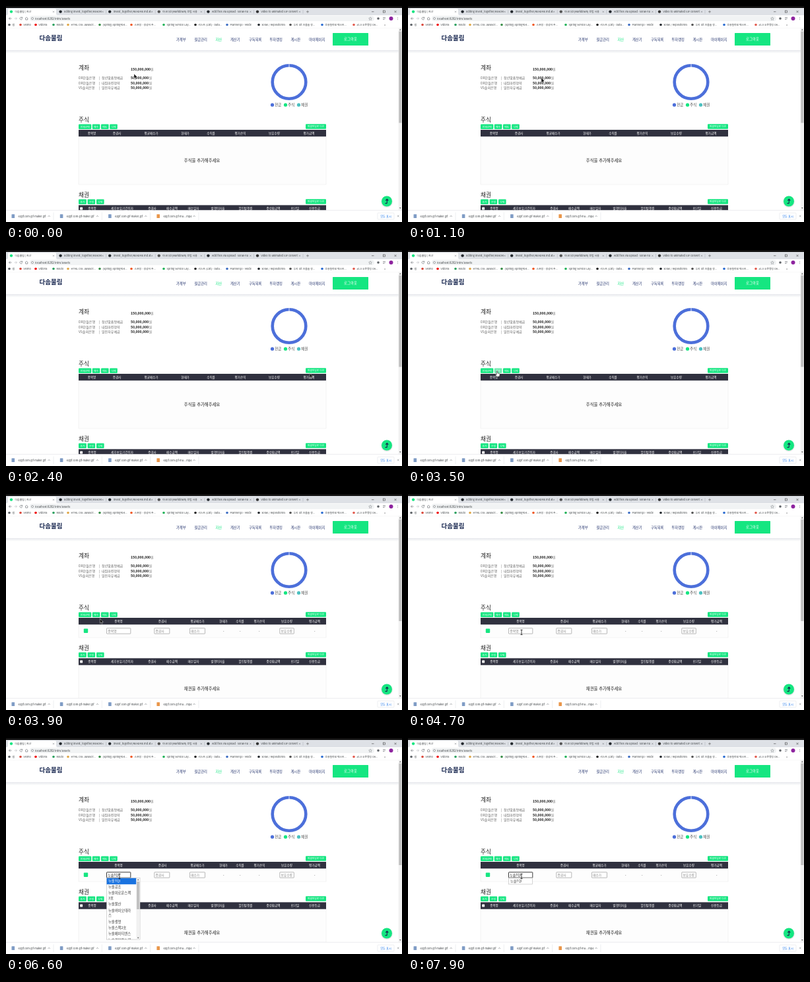
An HTML page that plays this animation: 600 px wide and 328 px high, repeating every 8000 ms.

```html
<!DOCTYPE html>
<html lang="ko">
<head>
<meta charset="utf-8">
<title>자산</title>
<style>
html, body { margin: 0; width: 100%; height: 100%; overflow: hidden; background: #fff; }
svg { display: block; width: 600px; height: 328px; }
text { font-family: "Noto Sans CJK KR", "Noto Sans CJK", "Noto Sans", sans-serif; white-space: pre; }
</style>
</head>
<body>
<svg id="stage" viewBox="0 0 600 328"></svg>
<script>
const LOOP = 8000, STEP = 100;
const GREEN = '#15e681', DARK = '#30313f', NAVY = '#26356f', BLUE = '#4c6fda';

const rect = (x, y, w, h, fill, extra = '') =>
  `<rect x="${x}" y="${y}" width="${w}" height="${h}" fill="${fill}" ${extra}/>`;
const dot = (x, y, r, fill) => `<circle cx="${x}" cy="${y}" r="${r}" fill="${fill}"/>`;
const line = (d, color, width = .6) =>
  `<path d="${d}" fill="none" stroke="${color}" stroke-width="${width}"/>`;
const text = (x, y, size, str, fill = '#222', extra = '') =>
  `<text x="${x}" y="${y}" font-size="${size}" fill="${fill}" ${extra}>${str}</text>`;
const mid = (x, y, size, str, fill, extra = '') =>
  text(x, y, size, str, fill, 'text-anchor="middle" ' + extra);
const group = (id, body, extra = '') => `<g id="${id}" ${extra}>${body}</g>`;
const cross = (x, y, r, color) =>
  line(`M${x - r} ${y - r}l${2 * r} ${2 * r}m0 ${-2 * r}l${-2 * r} ${2 * r}`, color, .5);

const button = (x, y, w, label, id = '') =>
  rect(x, y, w, 7.6, GREEN, `rx="1" id="${id}"`) + mid(x + w / 2, y + 5.1, 3.8, label, '#fff');
const headRow = (y, cells) => rect(110, y, 375, 10.6, DARK) +
  cells.map(([x, label]) => mid(x, y + 7, 4.6, label, '#fff', 'font-weight="500"')).join('');

function browserTop() {
  const tabs = [
    ['다솜불림 | 자산', GREEN], ['Editing invest_together/READM', '#24292e'],
    ['invest_together/README.md at', '#24292e'], ['마크다운(Markdown) 문법 사용', '#555'],
    ['Add files via upload · sorae-nu', '#24292e'], ['Video to animated GIF convert', '#333']
  ];
  const marks = [
    [5, '앱', '#5f6368'], [22, 'Velmo', '#d94a3d'], [45, 'Vidorra', '#f00000'], [72, 'Routo', '#2da160'],
    [94, 'HTML CSS JavaScri...', '#e0a848'], [142, '(Spring) Spring에서...', '#3b8f4a'],
    [190, '스프링 - 생성자 주...', '#f05a28'], [239, 'Spring Service Lay...', '#24b35a'],
    [287, '리스트 (List) - Data...', '#222'], [335, 'PlannerQo - Mode', '#3f6fc4'],
    [383, 'sorae / Repositories', '#24292e'], [431, '우리 Git 흐름을 정...', '#555'],
    [479, '운용철학원 텍스트...', '#2c6dd2'], [527, '#1.0 오픈뱅킹 OA...', '#e35b4f']
  ];
  let out = rect(0, 0, 600, 14, '#dee1e6') + rect(0, 0, 600, 3, '#111') +
    '<path d="M1 14Q3 14 3 11V6Q3 4 5 4H74Q76 4 76 6V11Q76 14 78 14Z" fill="#fff"/>';
  tabs.forEach(([label, color], i) => {
    const x = 8 + i * 74.6;
    out += dot(x, 8.6, 2.2, color) + text(x + 5.5, 10.2, 3.9, label, '#3c4043') +
      cross(x + 64, 8.7, 1, '#5f6368');
    if (i) out += line(`M${x + 69} 6v5.5`, '#9aa0a6', .4);
  });
  out += line('M455 8.7h4m-2 -2v4', '#444', .5) + line('M554 8.7h3.5', '#222', .5) +
    rect(571.5, 7, 3, 3, 'none', 'stroke="#222" stroke-width=".5"') + cross(590, 8.6, 1.5, '#222');
  out += rect(0, 14, 600, 19, '#fff') + rect(36, 14.8, 522, 8.2, '#f1f3f4', 'rx="4.1"') +
    line('M8.5 19H4.5m1.8 -1.8L4.5 19l1.8 1.8', '#5f6368') +
    line('M12.5 19h4m-1.8 -1.8l1.8 1.8l-1.8 1.8', '#b5b8bc') +
    line('M24.4 17.8a1.9 1.9 0 1 0 .3 1.8M24.8 16.6v1.7h-1.7', '#5f6368') +
    line('M29 19l2.2 -2l2.2 2M29.7 18.7v2.3h3v-2.3', '#5f6368') +
    '<circle cx="40" cy="19" r="1.6" fill="none" stroke="#5f6368" stroke-width=".5"/>' +
    text(44, 20.5, 4.2, 'localhost:8202/intro/assets', '#3c4043') +
    '<path d="M552 16.8l.7 1.5 1.7.2-1.2 1.2.3 1.7-1.5-.8-1.5.8.3-1.7-1.2-1.2 1.7-.2z" fill="none" stroke="#5f6368" stroke-width=".4"/>' +
    dot(564, 19, 1.8, '#5f6368') + line('M571 17.5h4m-4 1.5h4m-4 1.5h2.5', '#5f6368', .5) +
    dot(583.5, 19, 3, '#8e249f') + [17.3, 19, 20.7].map(y => dot(593.5, y, .45, '#5f6368')).join('');
  marks.forEach(([x, label, color]) => {
    out += dot(x, 28.5, 1.8, color) + text(x + 4.6, 30, 3.8, label, '#3c4043');
  });
  return out + text(573, 30, 4.5, '»', '#444');
}

function header() {
  const menu = [[258, '가계부'], [285.5, '월급관리'], [317.5, '자산'], [340, '계산기'],
    [368, '구독목록'], [399.5, '투자랭킹'], [431.5, '게시판'], [459, '마이페이지']];
  return rect(0, 33, 595, 39, 'url(#shade)') + rect(0, 33, 595, 34, '#fff') +
    line('M0 33.2H600', '#e2e4e7', .4) +
    text(50.5, 52, 9.5, '다솜불림', '#17264f', 'font-weight="900"') +
    menu.map(([x, s]) => text(x, 52.5, 5.3, s, s === '자산' ? GREEN : NAVY, 'font-weight="500"')).join('') +
    rect(495, 41, 54, 19, GREEN, 'rx=".6"') + mid(522, 52.4, 5.4, '로그아웃', '#fff', 'font-weight="500"');
}

function account() {
  const rows = [['DR한들은행', '청년맞춤형예금'], ['DR한들은행', '내집마련청약'], ['VS솔뫼은행', '알찬자유예금']];
  const amount = (y, s) => text(189, y, 5.05, s, '#111', 'font-weight="700"');
  let out = text(110, 97, 8.8, '계좌', '#222', 'font-weight="500"') +
    amount(97.5, '150,000,000') + text(219, 97.5, 5, '원', '#777');
  rows.forEach(([bank, product], i) => {
    const y = 111.2 + i * 7.4;
    out += text(110, y, 5, bank, '#666') + text(140.4, y, 5, '|', '#666') +
      text(145, y, 5, product, '#666') + amount(y, '50,000,000') + text(216.5, y, 5, '원', '#777');
  });
  out += `<circle cx="429" cy="115.5" r="25.3" fill="none" stroke="${BLUE}" stroke-width="4.6"/>` +
    rect(428.6, 87, .8, 7, '#fff');
  [['현금', BLUE], ['주식', GREEN], ['채권', '#4bc0c0']].forEach(([s, color], i) => {
    out += dot(403.5 + i * 20, 150.2, 2.6, color) + text(407.3 + i * 20, 152.1, 5.3, s, '#444');
  });
  return out;
}

function stocks() {
  const box = (x, w, label, id = '') =>
    rect(x, 203.8, w, 8.4, '#fff', `rx=".6" stroke="#888" stroke-width=".6" id="${id}"`) +
    (label ? text(x + 1.7, 209.8, 4.7, label, '#888') : '');
  const empty = headRow(188, [[130, '종목명'], [168, '증권사'], [220, '평균매수가'], [271.5, '현재가'],
    [310.5, '수익률'], [355, '평가손익'], [406.5, '보유수량'], [459, '평가금액']]) +
    rect(110, 198.6, 375, 72.4, '#fdfdfd', 'stroke="#e8e8e8" stroke-width=".5"') +
    mid(297, 237.2, 6.35, '주식을 추가해주세요', '#222', 'font-weight="500"');
  const filled = headRow(188, [[170.5, '종목명'], [237, '증권사'], [290, '평균매수가'], [329.5, '현재가'],
    [354.5, '수익률'], [384, '평가손익'], [425.5, '보유수량'], [467.5, '평가금액']]) +
    rect(110, 198.6, 375, 19.4, '#fdfdfd', 'stroke="#e8e8e8" stroke-width=".5"') +
    rect(117.8, 204.5, 6.4, 6.4, GREEN, 'rx="1"') +
    box(152.5, 36.3, '', 'field') + box(224.8, 23, '증권사') + box(278.5, 23, '매수가') + box(414.8, 21.5, '보유수량') +
    [329.5, 354.5, 383.5, 467.5].map(x => mid(x, 209.8, 5, '-', '#444')).join('') +
    text(154.2, 209.8, 4.9, '', '#222', 'id="typed"') + rect(0, 205.4, .4, 5.2, '#111', 'id="caret"');
  return text(110, 175.5, 8.7, '주식', '#222', 'font-weight="500"') +
    button(110, 179.5, 19.3, '전체선택') + button(130.8, 179.5, 11.6, '매수', 'buy') +
    button(144, 179.5, 11.6, '매도') + button(157.2, 179.5, 11.6, '삭제') +
    button(454, 179.2, 31, '엑셀파일로 다운') + group('empty', empty) + group('filled', filled);
}

function bonds() {
  return text(110, 289.7, 8.7, '채권', '#222', 'font-weight="500"') +
    button(110, 293.5, 11.8, '추가') + button(123.6, 293.5, 11.6, '수정') + button(137, 293.5, 11.6, '삭제') +
    button(454, 293.2, 31, '엑셀파일로 다운') +
    headRow(302.4, [[130.5, '종목명'], [176, '세후보유기간이자'], [221.5, '증권사'], [251.5, '매수금액'],
      [284, '매수일자'], [321, '발행이자율'], [363, '할인발행률'], [405, '중상환금액'], [438, '만기일'], [467.5, '신용등급']]) +
    rect(112.2, 305.6, 3.9, 3.9, '#fff', 'rx=".5"') +
    rect(110, 313, 375, 73, '#fdfdfd', 'stroke="#e8e8e8" stroke-width=".5"') +
    mid(297, 351.3, 6.35, '채권을 추가해주세요', '#222', 'font-weight="500"');
}

function dropdowns() {
  const items = [['누솔공조', 228], ['누솔이로운스팩', 237], ['3호', 244.5], ['누솔물산', 254], ['누솔바이오테라', 263.7],
    ['스', 271], ['누솔생명', 280.7], ['누솔스팩2호', 290], ['누솔에이티엔스', 299.3], ['누솔케미칼소재', 308.5]];
  const frame = (w, h) => rect(152.4, 212.6, w, h, '#fff', 'stroke="#aaa" stroke-width=".5"');
  const list = frame(50.6, 93.4) + rect(152.6, 212.8, 44.8, 9.4, '#1a73e0', 'id="picked"') +
    text(155, 219.2, 5.3, '누솔TQI', '#333', 'id="first"') +
    `<g clip-path="url(#listClip)">${items.map(([s, y]) => text(155, y, 5.3, s, '#333')).join('')}</g>` +
    rect(197.5, 212.8, 5.3, 93, '#f1f1f1') + rect(198, 218, 4.3, 42, '#c1c1c1') +
    '<path d="M198.9 216l1.3-1.6 1.3 1.6zM198.9 302.8l1.3 1.6 1.3-1.6z" fill="#555"/>';
  return group('list', list) +
    group('single', frame(36.3, 9.4) + text(155, 219.3, 5.1, '누솔TQI', '#444'));
}

function browserBottom() {
  let out = rect(594.7, 33, 5.3, 277, '#f1f1f1') + rect(595.2, 38.5, 4.3, 139, '#c1c1c1', 'id="thumb"') +
    '<path d="M596 36.7l1.3-1.7 1.3 1.7zM596 306l1.3 1.7 1.3-1.7z" fill="#555"/>' +
    dot(577, 297.3, 8.8, '#00000018') + dot(577, 296.5, 8, GREEN) +
    line('M577.3 299.5v-6m-2 2l2 -2.1l2 2.1M574.5 299.6h2.9', '#17264f', 1.1) +
    rect(0, 310, 600, 18, '#fff') + line('M0 310.2H600', '#d5d7da', .5);
  for (let i = 0; i < 4; i++) {
    const x = 73.3 * i;
    out += rect(x + 8.5, 316.3, 4.6, 5.6, i < 3 ? '#7f9cc5' : '#e9964a', 'rx=".5"') +
      text(x + 18.5, 320.7, 3.9, i < 3 ? 'ezgif.com-gif-maker.gif' : 'ezgif.com-gif-ma....mp4', '#3c4043') +
      line(`M${x + 63.7} 319.9l1.5 -1.5l1.5 1.5`, '#5f6368') + line(`M${x + 72} 313.5v11.5`, '#dadce0', .5);
  }
  return out + rect(563, 314.2, 25, 9.8, '#fff', 'rx="1.2" stroke="#dadce0" stroke-width=".5"') +
    mid(575.5, 320.6, 4.2, '모두 표시', '#1a73e8') + cross(594.3, 319, 1.2, '#5f6368');
}

function pointers() {
  const hand = '<path d="M-.8 0Q0-.8.8 0V3L3.6 3.7Q4.3 4 4.2 5L3.6 8.2H-.7L-2.9 5Q-2.6 3.9-.8 5.2Z" fill="#fff" stroke="#111" stroke-width=".55"/>';
  const arrow = '<path d="M0 0V7.2L1.7 5.7 2.8 8.2 4 7.7 2.9 5.2H5.1Z" fill="#111" stroke="#fff" stroke-width=".4"/>';
  return group('pointer', group('arrow', arrow) + group('hand', hand) +
    group('beam', line('M-1.5 -3.6H1.5M0 -3.6V3.6M-1.5 3.6H1.5', '#111', .8)));
}

document.getElementById('stage').innerHTML =
  `<defs><linearGradient id="shade" x2="0" y2="1"><stop offset=".86" stop-color="#e4e6ea"/><stop offset="1" stop-color="#fff"/></linearGradient>
   <clipPath id="listClip"><rect x="152" y="222" width="45" height="83.8"/></clipPath></defs>` +
  rect(0, 0, 600, 328, '#fff') + header() + account() + stocks() + group('bonds', bonds()) +
  dropdowns() + browserBottom() + browserTop() + pointers();

const el = {};
document.querySelectorAll('[id]').forEach(node => { el[node.id] = node; });
const show = (id, on) => el[id].setAttribute('display', on ? 'inline' : 'none');
const set = (id, name, value) => el[id].setAttribute(name, value);

// time, x, y of the pointer
const path = [[0, 194, 103], [1100, 202, 109], [1400, 206, 112], [2300, 460, 187], [2700, 460, 187],
  [3300, 135, 184], [3700, 135, 184], [4400, 172, 210], [LOOP, 172, 210]];
const typing = [[0, ''], [5300, 'ㄴ'], [5400, '누'], [5600, '눗'], [5700, '누소'], [5800, '누솔'], [6400, '누솔TQI']];

function pointerAt(t) {
  const i = path.findIndex(p => p[0] > t);
  const [t0, x0, y0] = path[i - 1], [t1, x1, y1] = path[i];
  const u = (t - t0) / (t1 - t0), k = u * u * (3 - 2 * u);
  return [x0 + (x1 - x0) * k, y0 + (y1 - y0) * k];
}

function draw(time) {
  const t = Math.floor(time % LOOP / STEP) * STEP;
  const added = t >= 3600, focused = t >= 4800, picked = t >= 6400;
  const [x, y] = pointerAt(t);
  const overBuy = x > 130 && x < 142.5 && y > 179 && y < 187.2;
  const overField = added && x > 152 && y > 203.5;

  show('empty', !added);
  show('filled', added);
  set('bonds', 'transform', `translate(0 ${added ? -53 : 0})`);
  set('thumb', 'height', added ? 154.5 : 139);
  set('buy', 'fill', overBuy ? '#75eab2' : GREEN);

  const typed = typing.filter(k => k[0] <= t).pop()[1];
  el.typed.textContent = typed || '종목명';
  set('typed', 'fill', typed ? '#222' : '#888');
  set('field', 'stroke', focused ? '#222' : '#888');
  set('field', 'stroke-width', focused ? .9 : .6);
  show('caret', focused && !picked && t % 1000 < 500);
  set('caret', 'x', 154.2 + (typed ? el.typed.getComputedTextLength() : 0));

  show('list', t >= 5800 && t < 7200);
  show('picked', picked);
  set('first', 'fill', picked ? '#fff' : '#333');
  show('single', t >= 7200);

  set('pointer', 'transform', `translate(${x} ${y})`);
  show('hand', overBuy);
  show('beam', overField);
  show('arrow', !overBuy && !overField);
}

const start = performance.now();
function tick() {
  draw(performance.now() - start);
  requestAnimationFrame(tick);
}
tick();
</script>
</body>
</html>
```
